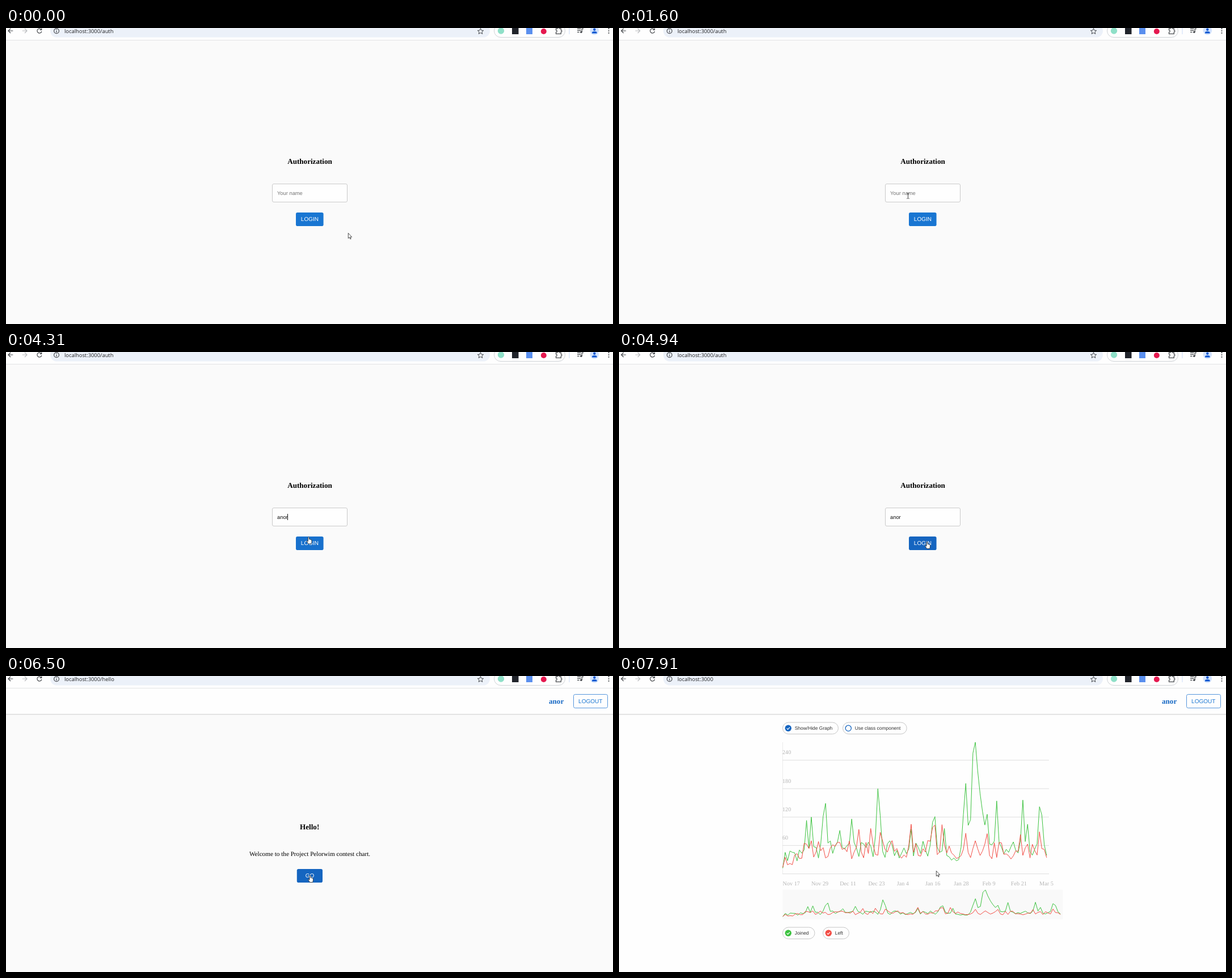
These frames come from a looping animation (1070 by 523 pixels, 8000 ms). An HTML page:

```html
<!DOCTYPE html>
<html lang="en">
<head>
<meta charset="utf-8">
<title>Login and chart demo</title>
<style>
  html, body { margin: 0; width: 100%; height: 100%; overflow: hidden; background: #fafafa; }
  svg { display: block; width: 1070px; height: 523px; }
  text { white-space: pre; text-rendering: geometricPrecision; }
  .url { font: 9.35px "Open Sans", "Noto Sans", sans-serif; fill: #1f2023; }
  .title { font: bold 13.1px "Liberation Serif", serif; }
  .para { font: 11.2px "Liberation Serif", serif; }
  .axis { font: 10.2px "Liberation Serif", serif; fill: #b5b5b5; }
  .field { font: 9.33px "Liberation Sans", sans-serif; }
  .btn { font: 10px "Liberation Sans", sans-serif; fill: #fff; }
  .chip { font: 8.45px "Liberation Sans", sans-serif; fill: #333; }
  .mid { text-anchor: middle; }
  .icon { fill: none; stroke: #45484c; stroke-width: 1.2; }
  .line { fill: none; stroke-width: 1; stroke-linejoin: round; }
</style>
</head>
<body>
<svg viewBox="0 0 1070 523">
  <rect id="page" width="1070" height="523" fill="#fafafa"/>

  <g id="auth">
    <text class="title mid" x="535.5" y="240.4">Authorization</text>
    <rect x="469.5" y="275.5" width="132" height="32" rx="2.5" fill="#fefefe" stroke="#cacaca"/>
    <text id="hint" class="field" x="478" y="294.5" fill="#757575">Your name</text>
    <text id="typed" class="field" x="478" y="294.5" fill="#111"></text>
    <rect id="caret" y="286" width="1" height="11" fill="#111"/>
    <rect id="login" x="511" y="326" width="48.6" height="24" rx="2.8"/>
    <text class="btn mid" x="535.4" y="341.4">LOGIN</text>
  </g>

  <g id="hello">
    <text class="title mid" x="535.2" y="270.8">Hello!</text>
    <text class="para mid" x="535.5" y="318.2">Welcome to the Project Pelorwim contest chart.</text>
    <rect id="go" x="512.8" y="341" width="45.2" height="24" rx="2.8"/>
    <text class="btn mid" x="535.5" y="356.4">GO</text>
  </g>

  <g id="header">
    <rect y="22" width="1070" height="45.5" fill="#fefefe"/>
    <path d="M0 67.7H1070" stroke="#cfcfcf"/>
    <path d="M0 68.7H1070" stroke="#f0f0f0"/>
    <text class="title" x="957" y="49" fill="#1769c4">anor</text>
    <rect x="1000.5" y="32.5" width="60" height="24" rx="2.8" fill="#fefefe" stroke="#5596dc"/>
    <text class="btn mid" x="1030.2" y="48" style="fill:#1976d2">LOGOUT</text>
  </g>

  <g id="chart"></g>

  <g id="toolbar">
    <rect width="1070" height="21.5" fill="#fefefe"/>
    <path d="M0 21.5H1070" stroke="#e2e3e5"/>
    <path class="icon" d="M12.3 5H4M8 1L4 5L8 9"/>
    <path class="icon" d="M28.7 5H37M33 1L37 5L33 9" style="stroke:#b9bbbe"/>
    <path class="icon" d="M62 2.5A4 4 0 1 0 62.8 6M62.7 .5V3.3H59.8"/>
    <rect x="78" y="-6.5" width="775" height="23" rx="11.5" fill="#ecf1f9"/>
    <circle class="icon" cx="89" cy="5.3" r="4.4"/>
    <path class="icon" d="M89 4.8V8M89 2.6V3.8"/>
    <text id="url" class="url" x="103" y="9"></text>
    <path class="icon" d="M836.5 .6L838 4.1L841.7 4.4L838.9 6.9L839.8 10.4L836.5 8.5L833.2 10.4L834.1 6.9L831.3 4.4L835 4.1Z" style="stroke-width:1"/>
    <rect x="860.5" y="-6.5" width="125" height="23" rx="11.5" fill="#fefefe" stroke="#cfd2d6"/>
    <circle cx="872.5" cy="5" r="5.7" fill="#8fe0c8"/>
    <rect x="892" y="-1" width="11.5" height="12" fill="#20232a"/>
    <rect x="917" y="-1" width="11" height="12" fill="#5a8fee"/>
    <circle cx="947.8" cy="6" r="5" fill="#e5184f"/>
    <path class="icon" d="M969.5 .8H972.3A1.5 1.5 0 0 1 975.3 .8H978.3V3.8A1.6 1.6 0 0 1 978.3 7V10.3H969.5V7.4A1.8 1.8 0 0 0 969.5 3.8Z"/>
    <path d="M993 0V11" stroke="#cbdcf7"/>
    <path class="icon" d="M1007 1.3H1013.5M1007 4.3H1013.5M1007 7.3H1010.5M1015.3 7.3V1.3H1018"/>
    <circle cx="1013.8" cy="7.3" r="1.7" fill="#45484c"/>
    <circle cx="1037.3" cy="4.5" r="7.8" fill="#d3e3fd"/>
    <path d="M1033 9.5V8.3Q1033 6 1037.3 6T1041.6 8.3V9.5Z" fill="#0b57d0"/>
    <circle cx="1037.3" cy="2.8" r="2.2" fill="#0b57d0"/>
    <path d="M1062.5 1.2V9" stroke="#45484c" stroke-width="2.2" stroke-linecap="round" stroke-dasharray="0 3.8"/>
  </g>

  <g id="cursor">
    <path id="arrow" d="M.3 .4V9.7L2.4 7.8L3.9 11L5.2 10.4L3.8 7.3H6.6Z" fill="#fff" stroke="#222" stroke-width=".8"/>
    <path id="beam" d="M-2.3 -4.6H-.8L0 -4L.8 -4.6H2.3M0 -4V4.2M-2.3 4.8H-.8L0 4.2L.8 4.8H2.3" fill="none" stroke="#333" stroke-width=".9"/>
    <path id="hand" d="M-1 1Q0 -.2 1 1V4.6Q2 4 2.8 4.9Q3.8 4.4 4.4 5.3Q5.4 5 5.4 6.2V9Q5.4 11 4.3 12.5H-.3L-3 8.6Q-3.5 7.2 -2.3 7.1L-1 8.3Z" fill="#fff" stroke="#222" stroke-width=".8"/>
  </g>
</svg>

<script>
const LOOP = 8000, TICK = 72, BLINK = 500;
const FOCUS_AT = 1080, HELLO_AT = 5000, EMPTY_AT = 7530, CHART_AT = 7680;
const LOGIN_HOVER = 4270, GO_HOVER = 5650;
const GREEN = '#3cc23f', RED = '#f34c44', BLUE = '#1565c0';
const $ = id => document.getElementById(id);
const show = (id, on) => $(id).setAttribute('display', on ? 'inline' : 'none');
const clamp = v => Math.min(1, Math.max(0, v));

function random(seed) {
  return () => (seed = seed * 16807 % 2147483647) / 2147483647;
}

// Daily noise with a quiet start and a quiet week, plus peaks that rise fast and decay
function series(seed, peaks) {
  const next = random(seed);
  return Array.from({ length: 112 }, (_, day) => {
    const quiet = 20 * Math.exp(-((day / 7) ** 2)) + 18 * Math.exp(-(((day - 72) / 3) ** 2));
    let value = 51 - quiet + (next() - .5) * 40;
    for (const [at, height] of Object.entries(peaks)) {
      const gap = day - at;
      if (gap === 0) return height;
      value = Math.max(value, height * (gap < 0 ? .45 : height / 356) ** Math.abs(gap));
    }
    return value;
  });
}

const joined = series(4127, { 10: 113, 12: 120, 17: 122, 18: 149, 24: 92, 29: 116, 40: 180, 41: 123,
  54: 95, 63: 109, 64: 121, 68: 96, 76: 126, 77: 191, 80: 255, 81: 278, 86: 126, 90: 154, 101: 156, 103: 105, 108: 142, 109: 124 });
const left = series(9173, { 12: 70, 32: 94, 37: 96, 41: 88, 54: 105, 63: 98, 64: 103, 67: 104, 77: 86, 86: 85, 100: 83, 108: 89 });

function plot(data, color, step, base, scale) {
  const points = data.map((v, i) => `${(288.7 + i * step).toFixed(1)},${(base - v * scale).toFixed(1)}`);
  return `<polyline class="line" stroke="${color}" points="${points.join(' ')}"/>`;
}

function chip(x, y, width, label, color, checked) {
  const cx = x + 9.8, cy = y + 10.3;
  const mark = checked
    ? `<circle cx="${cx}" cy="${cy}" r="5.7" fill="${color}"/>
       <path d="M${cx - 2.6} ${cy + .1}l1.9 1.9l3.4 -3.6" fill="none" stroke="#fff" stroke-width="1.2"/>`
    : `<circle cx="${cx}" cy="${cy}" r="5.1" fill="none" stroke="${color}" stroke-width="1.3"/>`;
  return `<rect x="${x}" y="${y}" width="${width}" height="20.5" rx="10.25" fill="#fefefe" stroke="#c6c6c6"/>
    ${mark}<text class="chip" x="${x + 21.2}" y="${y + 13.2}">${label}</text>`;
}

function buildChart() {
  let out = '<path d="M288.5 117V350" stroke="#ebebeb"/>';
  for (let i = 0; i < 5; i++) {
    const y = 349.6 - i * 50.2;
    out += `<path d="M288 ${y}H758" stroke="#dedede"/>`;
    if (i) out += `<text class="axis" x="288" y="${y - 10.4}">${i * 60}</text>`;
  }
  'Nov 17,Nov 29,Dec 11,Dec 23,Jan 4,Jan 16,Jan 28,Feb 9,Feb 21,Mar 5'.split(',').forEach((day, i) => {
    out += `<text class="axis" x="${288.6 + i * 50.28}" y="370">${day}</text>`;
  });
  out += plot(joined, GREEN, 4.19, 349.8, .8375) + plot(left, RED, 4.19, 349.8, .8375);
  out += '<rect x="288.5" y="377.5" width="494" height="52.5" fill="#f9f9f9"/>';
  out += plot(joined, GREEN, 4.41, 427.5, .178) + plot(left, RED, 4.41, 427.5, .178);
  out += chip(288.5, 82, 98, 'Show/Hide Graph', BLUE, true);
  out += chip(394.5, 82, 112.7, 'Use class component', BLUE, false);
  out += chip(288.5, 444, 56.5, 'Joined', GREEN, true);
  out += chip(359.5, 444, 46, 'Left', RED, true);
  $('chart').innerHTML = out;
}

// Pointer moves: start, end, destination
const moves = [
  [0, 350, 565, 312], [350, 640, 500, 286.5],
  [940, 1100, 504, 281.5], [1100, 1350, 509.5, 296.5],
  [3990, 4370, 541, 336], [4540, 4690, 543, 335],
  [5560, 5900, 543, 356], [5900, 6350, 530, 350],
  [6430, 6500, 536, 352], [6900, 7200, 533, 355],
  [7600, 7910, 559, 344],
];

function pointer(t) {
  let x = 603, y = 362;
  for (const [start, end, toX, toY] of moves) {
    if (t < start) break;
    // Sampled in ticks, like a screen recording
    const k = t >= end ? 1 : clamp(Math.floor((t - start) / TICK) * TICK / (end - start));
    x += (toX - x) * k;
    y += (toY - y) * k;
  }
  return { x, y };
}

// Pointer shape inside a box, while that box is live
const zones = [
  { shape: 'beam', from: 0, to: HELLO_AT, box: [469, 275, 133, 33] },
  { shape: 'hand', from: 0, to: 5260, box: [511, 326, 49, 24] },
  { shape: 'hand', from: 5260, to: 7440, box: [513, 341, 45, 24] },
];

function shapeAt(t, { x, y }) {
  const zone = zones.find(({ from, to, box: [left, top, width, height] }) =>
    t >= from && t < to && x >= left && x <= left + width && y >= top && y <= top + height);
  return zone ? zone.shape : 'arrow';
}

const NAME = 'anor';
const keyTimes = [2450, 2620, 2760, 3080];

function drawField(t) {
  const pressed = keyTimes.filter(at => at <= t);
  const reset = pressed.length ? pressed[pressed.length - 1] : FOCUS_AT;
  $('typed').textContent = NAME.slice(0, pressed.length);
  show('hint', !pressed.length);
  show('caret', t >= FOCUS_AT && Math.floor((t - reset) / BLINK) % 2 === 0);
  $('caret').setAttribute('x', Math.floor(478 + $('typed').getComputedTextLength()));
}

// Button colour while hovered, eased over 250 ms
function hover(t, start) {
  const k = clamp((t - start) / 250);
  const mix = (a, b) => Math.round(a + (b - a) * k * (2 - k));
  return `rgb(${mix(25, 21)},${mix(118, 101)},${mix(210, 192)})`;
}

function draw(t) {
  const charted = t >= EMPTY_AT, greeted = t >= HELLO_AT;
  show('auth', !greeted);
  show('header', greeted);
  show('hello', greeted && !charted);
  show('chart', t >= CHART_AT);
  $('page').setAttribute('fill', charted ? '#fefefe' : '#fafafa');
  $('url').textContent = 'localhost:3000' + (charted ? '' : greeted ? '/hello' : '/auth');
  $('login').setAttribute('fill', hover(t, LOGIN_HOVER));
  $('go').setAttribute('fill', hover(t, GO_HOVER));
  if (!greeted) drawField(t);

  const spot = pointer(t), shape = shapeAt(t, spot);
  $('cursor').setAttribute('transform', `translate(${spot.x} ${spot.y})`);
  for (const id of ['arrow', 'beam', 'hand']) show(id, id === shape);
}

function tick() {
  draw(performance.now() % LOOP);
  requestAnimationFrame(tick);
}

buildChart();
tick();
</script>
</body>
</html>
```
